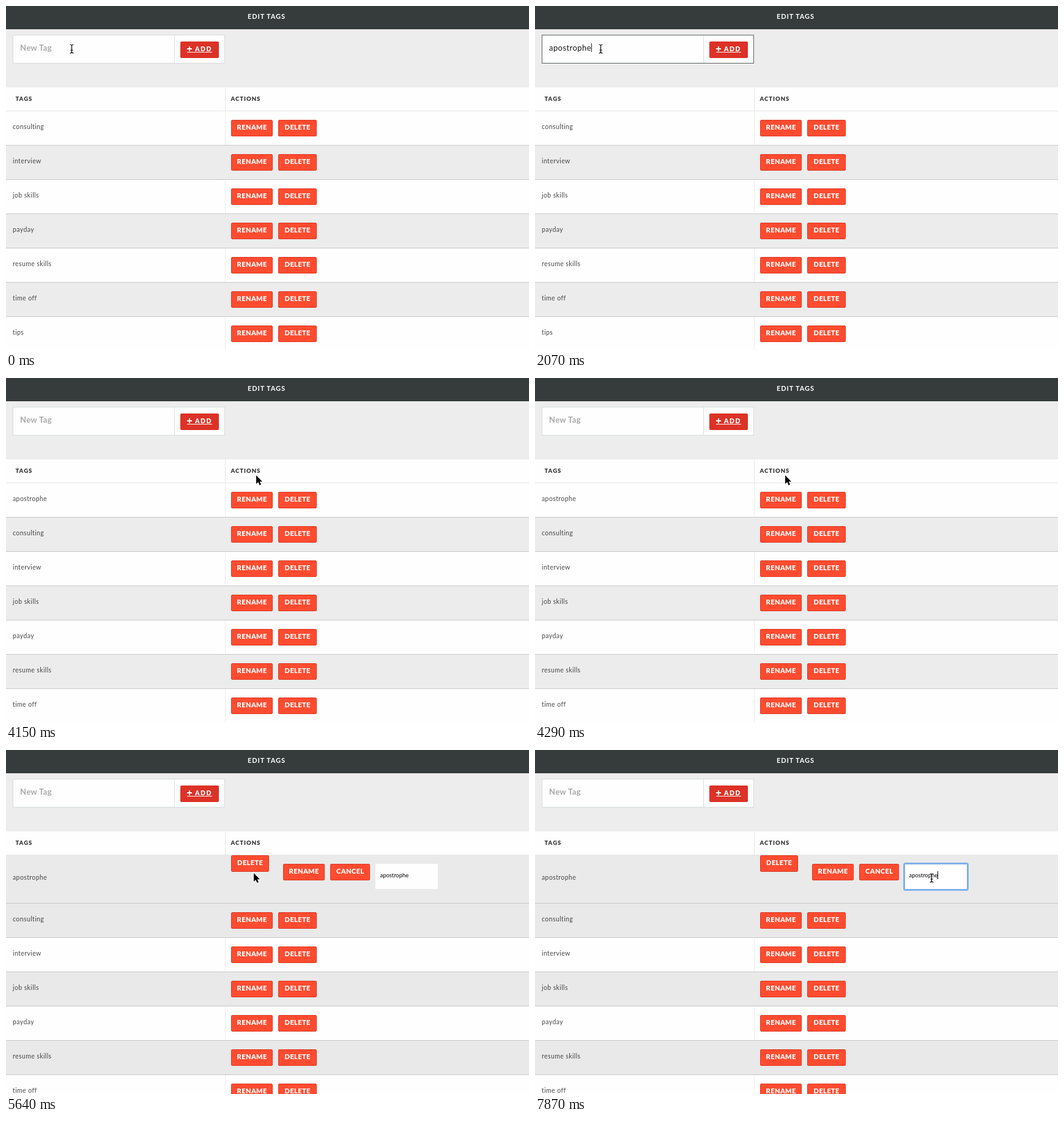
Write an HTML page that moves like this. It is 855 by 562 pixels and loops after 8 s.

```html
<!DOCTYPE html>
<html lang="en">
<head>
<meta charset="utf-8">
<title>Edit tags</title>
<style>
html, body { margin: 0; width: 100%; height: 100%; overflow: hidden; background: #ededed; }
svg { display: block; width: 855px; height: 562px; font-family: Lato, "Open Sans", sans-serif; }
text { white-space: pre; }
.title { font-size: 11px; font-weight: 700; letter-spacing: .9px; fill: #fff; }
.head { font-size: 9.5px; font-weight: 900; letter-spacing: 1px; fill: #333; }
.label { font-size: 11px; font-weight: 900; letter-spacing: .4px; fill: #fff; text-anchor: middle; }
.add { font-size: 10.5px; font-weight: 900; letter-spacing: 1.5px; fill: #fff; }
.tag { font-size: 10.5px; letter-spacing: .4px; fill: #484848; }
.typed { font-size: 13px; letter-spacing: .43px; fill: #161616; }
.hint { font-size: 13px; font-weight: 700; letter-spacing: .35px; fill: #a9a9a9; }
.edit { font-size: 9.4px; fill: #000; }
</style>
</head>
<body>
<svg id="stage" viewBox="0 0 855 562"></svg>
<script>
const LOOP = 8000;
const WORD = 'apostrophe';
const TAGS = ['consulting', 'interview', 'job skills', 'payday', 'resume skills', 'time off', 'tips'];
const stage = document.getElementById('stage');

// Each track is a list of [start, ...values]; a value holds until the next start.
const pointer = [
  [0, 'beam', 107.5, 70],
  [2370, 'beam', 165.5, 76], [2520, 'beam', 255.5, 84], [2670, 'arrow', 340, 87], [2810, 'hand', 336, 75],
  [4000, 'arrow', 365, 112], [4150, 'arrow', 409, 159], [4300, 'arrow', 411, 178],
  [4440, 'hand', 409, 192], [4590, 'hand', 406, 199], [4740, 'hand', 405, 203],
  [5640, 'arrow', 405, 201], [6380, 'arrow', 440, 188], [6530, 'arrow', 476, 179],
  [6830, 'arrow', 520, 179], [6980, 'arrow', 570, 179], [7130, 'arrow', 630, 181],
  [7270, 'beam', 668.5, 205], [7420, 'beam', 674.5, 209], [7870, 'beam', 648.5, 209]
];
const letters = [[0, 0], [1030, 1], [1180, 2], [1330, 3], [1480, 5], [1620, 7], [1770, 8], [2070, 10], [3110, 0]];
const caretOn = [[0, false], [140, true], [590, false], [1030, true], [2370, false]];
const frameColor = [[0, '#d9dbdb'], [140, '#9a9d9d'], [290, '#5c6262'], [3110, '#9a9d9d'], [3250, '#d6dcdd']];
const firstRow = [[0, '#fefefe'], [4300, '#eeeeee'], [4440, '#e2e2e2'], [5640, '#eaeaea']];

const at = (track, t) => track.filter(k => k[0] <= t).pop().slice(1);

const rect = (x, y, w, h, fill, more = '') =>
  `<rect x="${x}" y="${y}" width="${w}" height="${h}" fill="${fill}" ${more}/>`;
const text = (cls, x, y, s, more = '') => `<text class="${cls}" x="${x}" y="${y}" ${more}>${s}</text>`;
const button = (x, y, w, s) =>
  rect(x + .5, y + .5, w - 1, 26, '#ff4c30', 'rx="1.5" stroke="#df3521"') +
  text('label', x + w / 2 + .2, y + 16, s);

const BEAM = 'M-3-7Q-.5-7 0-5.5Q.5-7 3-7M0-5.5V5.5M-3 7Q-.5 7 0 5.5Q.5 7 3 7M-2 2H2';
const cursors = {
  beam: `<g fill="none"><path d="${BEAM}" stroke="#fff" stroke-width="2.6" opacity=".7"/>
    <path d="${BEAM}" stroke="#000" stroke-width="1.2"/></g>`,
  arrow: `<path d="M0 0V14L3.3 11L5.5 16L8 15L5.8 10.3H10Z" stroke="#fff" stroke-width="2" paint-order="stroke"/>`,
  hand: `<path d="M-1.3 1.2C-.8-.5 1.3-.2 1.7 1.5L3 6C4 5 5.5 5.2 6 6.4C7 5.6 8.4 6 8.8 7.2
    C10 6.8 11 7.6 11 9V12.5L9.5 15.5V17.5H2.5V16L-3 10.5C-4.5 8.6-2.5 7.2-1 8.6L.6 9.8Z"
    fill="#fff" stroke="#000" stroke-width="1.1"/><path d="M4 11V15M6.2 11V15M8.3 11V15" stroke="#000" stroke-width=".9"/>`
};

function addForm(t) {
  const [color] = at(frameColor, t);
  const typed = WORD.slice(0, at(letters, t)[0]);
  const hover = t >= 2810 && t < 4000;
  return rect(11.5, 47.5, 346, 46, '#fefefe', `stroke="${color}"`) +
    rect(275, 48, 1, 45, t < 140 ? '#dedede' : '#d6e2dc') +
    (typed ? text('typed', 23, 73, typed, 'id="typed"') : text('hint', 23, 73, 'New Tag')) +
    (at(caretOn, t)[0] ? rect(23, 61, 1, 14, '#222', 'id="caret"') : '') +
    rect(285, 58, 63, 27, hover ? '#cf2b20' : '#dc3227', 'rx="2"') +
    rect(296, 69, 8, 2, '#fff') + rect(299, 66, 2, 8, '#fff') +
    text('add', 309, 74, 'ADD') + rect(296, 75, 41, 1, '#fff');
}

function renameForm(t) {
  const focus = t >= 7420;
  return button(368, 172, 62, 'DELETE') + button(453, 186, 68, 'RENAME') + button(530, 186, 65, 'CANCEL') +
    (focus ? rect(603.5, 185.5, 104, 43, '#fff', 'rx="2" stroke="#7fb2ea" stroke-width="3"')
           : rect(604, 186, 102, 41, '#fefefe')) +
    text('edit', 611.5, 208, WORD, 'id="edit"') +
    (focus ? rect(659, 198, 1, 13, '#000', 'id="editCaret"') : '');
}

function table(t) {
  const editing = t >= 5640;
  const tags = t >= 3110 ? [WORD, ...TAGS] : TAGS;
  let out = rect(0, 133, 855, 429, '#fefefe') + rect(0, 171, 855, 1, '#e8e8e8') +
    rect(358, 133, 1, 39, '#e6e6e6') + text('head', 15.5, 155, 'TAGS') + text('head', 367.5, 155, 'ACTIONS');
  tags.slice(0, 7).forEach((tag, i) => {
    const open = editing && i === 0;
    const y = 172 + 56 * i + (editing && i ? 23 : 0);
    const h = open ? 78 : 55;
    const [fill] = i ? [i % 2 ? (editing ? '#e9e9e9' : '#ececec') : '#fefefe'] : at(firstRow, t);
    out += rect(0, y, 855, h, fill) + rect(0, y + h, 855, 1, '#c8c8c8');
    if (fill === '#fefefe') out += rect(358, y, 1, h, '#ececec');
    out += text('tag', 11, y + (open ? 40 : 29), tag);
    out += open ? renameForm(t) : button(368, y + 14, 68, 'RENAME') + button(445, y + 14, 63, 'DELETE');
  });
  return out;
}

// Put a caret right after the text it belongs to.
function place(caretId, textId, x) {
  const caret = document.getElementById(caretId), label = document.getElementById(textId);
  if (caret && label) caret.setAttribute('x', Math.round(x + label.getComputedTextLength()));
}

let shown = '';
function draw(now) {
  const t = now % LOOP;
  const [shape, x, y] = at(pointer, t);
  const markup = rect(0, 0, 855, 562, '#ededed') + rect(0, 0, 855, 38, '#363c3c') +
    text('title', 395, 21, 'EDIT TAGS') + addForm(t) + table(t) +
    `<g transform="translate(${x} ${y})">${cursors[shape]}</g>`;
  if (markup !== shown) {
    stage.innerHTML = shown = markup;
    place('caret', 'typed', 23);
    place('editCaret', 'edit', 611.5);
  }
}

const start = performance.now();
function tick() {
  draw(performance.now() - start);
  requestAnimationFrame(tick);
}
tick();
</script>
</body>
</html>
```
